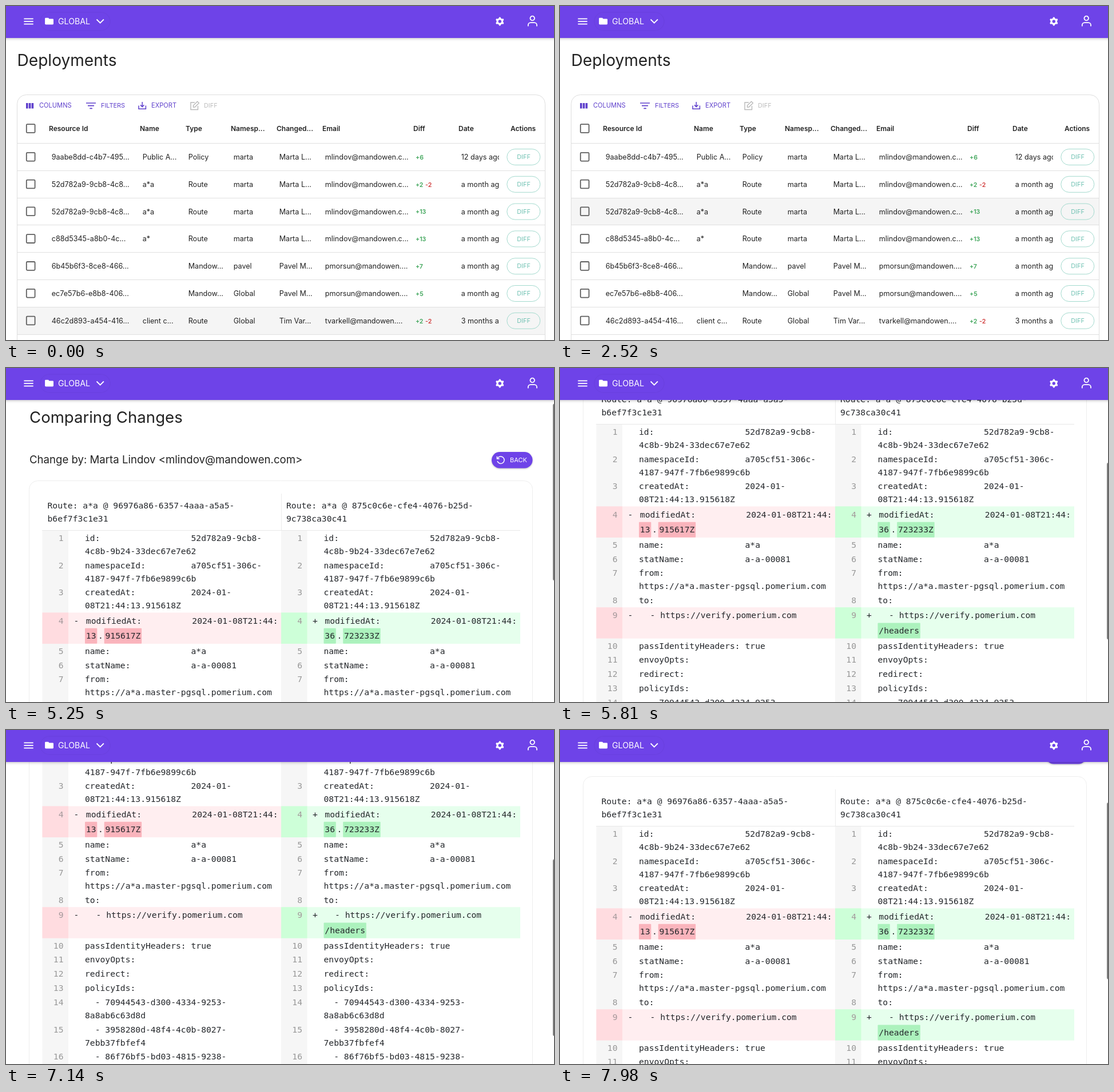
Recreate the animation shown at these times as an HTML page with a canvas. Size 958 by 585 pixels, loop 8000 ms.

```html
<!DOCTYPE html>
<html lang="en">
<head>
<meta charset="utf-8">
<title>Deployments</title>
<style>
html, body { margin: 0; width: 100%; height: 100%; overflow: hidden; background: #fff; }
canvas { display: block; }
</style>
</head>
<body>
<canvas id="stage" width="958" height="585"></canvas>
<script>
const ctx = document.getElementById('stage').getContext('2d');
const W = 958, H = 585, LOOP = 8000, STEP = 70;
const SANS = 'Inter, "Open Sans", sans-serif';
const MONO = '"DejaVu Sans Mono", "Liberation Mono", monospace';
const PURPLE = '#6e43e8', VIOLET = '#5f40cc', INK = '#222222';
const MONO_SIZE = 14.68, CH = MONO_SIZE * 0.602;

// ---- drawing helpers ----
function text(str, x, yMid, size, color = INK, weight = 400, family = SANS, align = 'left') {
  ctx.font = `${weight} ${size}px ${family}`;
  ctx.textAlign = align;
  ctx.fillStyle = color;
  ctx.fillText(str, x, yMid + size * 0.36);
}
const mono = (str, x, y, color = '#24272b', align) => text(str, x, y, MONO_SIZE, color, 400, MONO, align);
function rect(x, y, w, h, color) {
  ctx.fillStyle = color;
  ctx.fillRect(x, y, w, h);
}
function rounded(x, y, w, h, r, fill, stroke, lineWidth = 1) {
  ctx.beginPath();
  ctx.roundRect(x, y, w, h, r);
  if (fill) { ctx.fillStyle = fill; ctx.fill(); }
  if (stroke) { ctx.strokeStyle = stroke; ctx.lineWidth = lineWidth; ctx.stroke(); }
}
function path(d, color, lineWidth, x = 0, y = 0) {
  ctx.save();
  ctx.translate(x, y);
  const p = new Path2D(d);
  if (lineWidth) {
    ctx.strokeStyle = color;
    ctx.lineWidth = lineWidth;
    ctx.stroke(p);
  } else {
    ctx.fillStyle = color;
    ctx.fill(p);
  }
  ctx.restore();
}
function shadowed(blur, dy, draw) {
  ctx.save();
  ctx.shadowColor = 'rgba(0,0,0,.26)';
  ctx.shadowBlur = blur;
  ctx.shadowOffsetY = dy;
  draw();
  ctx.restore();
}
function lerpKeys(keys, t) {
  if (t <= keys[0][0]) return keys[0][1];
  for (let i = 1; i < keys.length; i++) {
    const [t0, v0] = keys[i - 1], [t1, v1] = keys[i];
    if (t <= t1) return v0 + (v1 - v0) * (t - t0) / (t1 - t0);
  }
  return keys[keys.length - 1][1];
}

// ---- top bar ----
function gear(x, y) {
  ctx.beginPath();
  for (let i = 0; i < 24; i++) {
    const a = (i + 1.5) * Math.PI / 12, r = i % 4 < 2 ? 7.6 : 5.8;
    ctx.lineTo(x + r * Math.cos(a), y + r * Math.sin(a));
  }
  ctx.closePath();
  ctx.moveTo(x + 2.7, y);
  ctx.arc(x, y, 2.7, 0, 7);
  ctx.fillStyle = '#fff';
  ctx.fill('evenodd');
}
function topBar() {
  shadowed(5, 1, () => rect(-10, 0, W + 20, 56, PURPLE));
  rounded(60, 11, 122, 32, 16, null, 'rgba(0,0,0,.03)', 1.5);
  for (const y of [21.5, 26.1, 30.7]) rect(31.4, y, 16.3, 1.8, '#fff');
  path('M69.5 20.7h4.5l1.6 1.7h6q1.4 0 1.4 1.4v7.2q0 1.4-1.4 1.4h-12.1q-1.4 0-1.4-1.4v-8.9q0-1.4 1.4-1.4z', '#fff');
  text('GLOBAL', 91, 26.7, 14.2, '#fff');
  path('M158.5 23.5l6.2 6.2 6.2-6.2', '#fff', 1.8);
  gear(863.3, 27);
  path('M924 21.5a3.8 3.8 0 1 1-7.6 0a3.8 3.8 0 1 1 7.6 0zM912.8 35.5v-2a4.3 4.3 0 0 1 4.3-4.3h6.6a4.3 4.3 0 0 1 4.3 4.3v2', '#fff', 1.8);
}

// ---- deployments table ----
const COLUMNS = [75, 234, 314, 393, 473, 553, 712, 791];
const TITLES = ['Resource Id', 'Name', 'Type', 'Namesp...', 'Changed...', 'Email', 'Diff', 'Date'];
const MARTA = ['marta', 'Marta L...', 'mlindov@mandowen.c...'];
const PAVEL = ['Pavel M...', 'pmorsun@mandowen....'];
const MONTH = 'a month ago';
const ROWS = [
  ['9aabe8dd-c4b7-495...', 'Public A...', 'Policy', ...MARTA, '+6', '12 days ago'],
  ['52d782a9-9cb8-4c8...', 'a*a', 'Route', ...MARTA, '+2 -2', MONTH],
  ['52d782a9-9cb8-4c8...', 'a*a', 'Route', ...MARTA, '+13', MONTH],
  ['c88d5345-a8b0-4c...', 'a*', 'Route', ...MARTA, '+13', MONTH],
  ['6b45b6f3-8ce8-466...', '', 'Mandow...', 'pavel', ...PAVEL, '+7', MONTH],
  ['ec7e57b6-e8b8-406...', '', 'Mandow...', 'Global', ...PAVEL, '+5', MONTH],
  ['46c2d893-a454-416...', 'client c...', 'Route', 'Global', 'Tim Var...', 'tvarkell@mandowen....', '+2 -2', '3 months ago']
];
const HOVER = [[0, 6], [490, -1], [1540, 0], [1750, 1], [2380, 2], [2870, 1]];
const ROW_H = 47.8, ROW_TOP = 240.5;

const checkbox = y => rounded(35.8, y - 7.4, 14.8, 14.8, 1.5, null, '#5f5f5f', 1.8);

function toolbar() {
  for (let i = 0; i < 3; i++) rect(35 + i * 4.8, 170, 3.6, 9.5, VIOLET);
  text('COLUMNS', 58, 174.5, 11.1, VIOLET);
  path('M140 170h17M143 174.7h11M146.3 179.4h4.6', VIOLET, 1.7);
  text('FILTERS', 166, 174.5, 10.9, VIOLET);
  path('M232 174.5v5.8h12.4v-5.8M238.2 168v8.4M235 173.4l3.2 3.2 3.2-3.2', VIOLET, 1.5);
  text('EXPORT', 254, 174.5, 11.1, VIOLET);
  path('M330 169h-7v12.5h12.5v-6.5M327.5 177.3v-3l7-7 2.8 2.8-7 7z', '#b9b9b9', 1.4);
  text('DIFF', 346, 174.5, 10.9, '#bdbdbd');
}
function diffCell(value, y) {
  const [plus, minus] = value.split(' ');
  text(plus, 716, y + 0.5, 10.6, '#3fa55a', 600);
  if (minus) text(minus, 733, y + 0.5, 10.6, '#d03a3a', 600);
}
function tableRow(cells, i, hovered) {
  const top = ROW_TOP + i * ROW_H, y = top + 24;
  if (hovered) rect(20, top, 922, ROW_H, '#f5f5f5');
  rect(20, Math.floor(top), 922, 1, '#e0e0e0');
  checkbox(y - 0.3);
  cells.forEach((cell, c) => {
    if (c === 6) return diffCell(cell, y);
    ctx.save();
    ctx.beginPath();
    ctx.rect(0, top, c === 7 ? 862 : W, ROW_H);
    ctx.clip();
    text(cell, COLUMNS[c] + 4.7, y, 12.6);
    ctx.restore();
  });
}
function actionButton(i, tint) {
  const y = ROW_TOP + i * ROW_H + 24;
  rounded(875.8, y - 14, 58, 28, 14, tint ? `rgba(98,190,172,${tint})` : null, '#a3dace');
  text('DIFF', 905, y - 0.3, 10.9, '#70c2b3', 400, SANS, 'center');
}
function ripple(t) {
  const k = Math.min(1, (t - 3220) / 420);
  if (k <= 0) return;
  ctx.save();
  ctx.beginPath();
  ctx.roundRect(876, 298.5, 58, 28, 14);
  ctx.clip();
  ctx.beginPath();
  ctx.arc(905, 312, 34 * k, 0, 7);
  ctx.fillStyle = 'rgba(98,190,172,.22)';
  ctx.fill();
  ctx.restore();
}
function deployments(t) {
  text('Deployments', 19.5, 94.5, 28.1);
  toolbar();
  checkbox(214.5);
  TITLES.forEach((title, i) => text(title, COLUMNS[i], 214.7, 12, INK, 600));
  text('Actions', 882, 214.7, 12, INK, 600);
  if (t >= 1400 && t < 1540)
    for (const x of [...COLUMNS, 870.5]) rect(x - 10, 208, 1.8, 13, '#e0e0e0');
  const hover = HOVER.filter(([start]) => t >= start).pop()[1];
  ROWS.forEach((row, i) => {
    tableRow(row, i, i === hover);
    actionButton(i, i === 1 && t >= 2870 ? 0.05 * Math.min(1, (t - 2800) / 280) : 0);
  });
  rect(20, 575, 922, 1, '#e0e0e0');
  ripple(t);
  rounded(19.5, 155.5, 923, 500, 16, null, '#dedede');
}

// ---- comparison page ----
const field = (key, value) => (key + ':').padEnd(21) + value;
// Each entry: lines shared by both sides, or a pair of changed sides with marked words.
const LINES = [
  [field('id', '52d782a9-9cb8-'), '4c8b-9b24-33dec67e7e62'],
  [field('namespaceId', 'a705cf51-306c-'), '4187-947f-7fb6e9899c6b'],
  [field('createdAt', '2024-01-'), '08T21:44:13.915618Z'],
  { first: field('modifiedAt', '2024-01-08T21:44:'), words: [['13', '.', '915617Z'], ['36', '.', '723233Z']] },
  [field('name', 'a*a')],
  [field('statName', 'a-a-00081')],
  ['from:', 'https://a*a.master-pgsql.pomerium.com'],
  ['to:'],
  { first: '  - https://verify.pomerium.com', words: [[], ['/headers']] },
  [field('passIdentityHeaders', 'true')],
  ['envoyOpts:'],
  ['redirect:'],
  ['policyIds:'],
  ['  - 70944543-d300-4334-9253-', '8a8ab6c63d8d'],
  ['  - 3958280d-48f4-4c0b-8027-', '7ebb37fbfef4'],
  ['  - 86f76bf5-bd03-4815-9238-', '4c1d90be27a5'],
  ['enabled: true']
];
const SIDES = [
  { x: 63.5, sign: '-', bg: '#ffeef0', gutter: '#ffdce0', word: '#fab4bc' },
  { x: 481, sign: '+', bg: '#e6ffed', gutter: '#cdffd8', word: '#acf2bd' }
];
const HEADS = [
  ['Route: a*a @ 96976a86-6357-4aaa-a5a5-', 'b6ef7f3c1e31'],
  ['Route: a*a @ 875c0c6e-cfe4-4076-b25d-', '9c738ca30c41']
];

function markedWords(words, x, y, color) {
  for (const word of words) {
    const w = word.length * CH + 3.6;
    if (word !== '.') rounded(x, y - 13, w, 27, 1, color);
    mono(word, x + 1.8, y);
    x += w;
  }
}
function diffLine(line, number, side, s, y) {
  const changed = !Array.isArray(line);
  const height = changed ? 54.6 : line.length > 1 ? 47.8 : 24.8;
  const left = side.x + 74.5;
  if (changed) rect(side.x, y, 418, height, side.bg);
  rect(side.x, y, 45.5, height + (changed ? 0 : 0.3), changed ? side.gutter : '#f6f6f6');
  const mid = y + (changed ? 14 : 12.5);
  mono(number, side.x + 37, mid, changed ? '#a3989a' : '#979797', 'right');
  if (changed) {
    mono(side.sign, side.x + 55, mid);
    mono(line.first, left + 1.8, mid);
    markedWords(line.words[s], left, mid + 26.3, side.word);
  } else {
    line.forEach((str, i) => mono(str, left, mid + i * 23));
  }
  return height;
}
function backButton() {
  shadowed(3, 1, () => rounded(849, 155, 71.5, 28.5, 14.3, PURPLE));
  path('M-5.5 -3.2A6.2 6.2 0 1 1 -6 1.8M-6.6 -6.6v4.3h4.3', '#fff', 1.5, 865, 169.3);
  text('BACK', 881, 168.7, 11, '#fff');
}
function comparison(scroll) {
  ctx.save();
  ctx.translate(0, -scroll);
  text('Comparing Changes', 41, 94.5, 27.6);
  text('Change by: Marta Lindov <mlindov@mandowen.com>', 41, 168.5, 18.6);
  backButton();
  rounded(40.5, 205.5, 880, 760, 15, null, '#eeeeee');
  rect(481, 228, 1, 64, '#ebebeb');
  rect(63, 292, 836, 1, '#e8e8e8');
  SIDES.forEach((side, s) => {
    HEADS[s].forEach((str, i) => mono(str, side.x + 9, 248.7 + i * 23));
    let y = 293;
    ctx.save();
    ctx.beginPath();
    ctx.rect(63, 293, 836, 700);
    ctx.clip();
    LINES.forEach((line, i) => { y += diffLine(line, i + 1, side, s, y); });
    ctx.restore();
  });
  ctx.restore();
}

// ---- timeline ----
const SCROLL = [
  [5180, 0], [5250, 8], [5390, 60], [5530, 130], [5670, 176], [5810, 194], [5950, 199],
  [6160, 199], [6230, 202], [6370, 227], [6510, 267], [6650, 297], [6790, 309], [6930, 313],
  [7000, 313], [7070, 310], [7210, 295], [7350, 267], [7490, 234], [7980, 124]
];
const LEAVE = 3290, ENTER = 3640, SETTLED = 4550;

function render(t) {
  rect(0, 0, W, H, '#fff');
  if (t < ENTER) {
    ctx.globalAlpha = t < LEAVE ? 1 : 1 - 0.8 * (t - LEAVE) / (ENTER - LEAVE);
    deployments(t);
  } else {
    const k = Math.min(1, (t - ENTER + STEP) / (SETTLED - ENTER));
    ctx.globalAlpha = 1 - (1 - k) ** 3;
    const scroll = Math.round(lerpKeys(SCROLL, t));
    comparison(scroll);
    if (t >= 5250) rounded(956, 58 + scroll * 0.555, 6, 310, 3, '#7d7d7d');
  }
  ctx.globalAlpha = 1;
  topBar();
}
function tick() {
  const t = performance.now() % LOOP;
  render(Math.floor(t / STEP) * STEP);
  requestAnimationFrame(tick);
}
tick();
</script>
</body>
</html>
```
